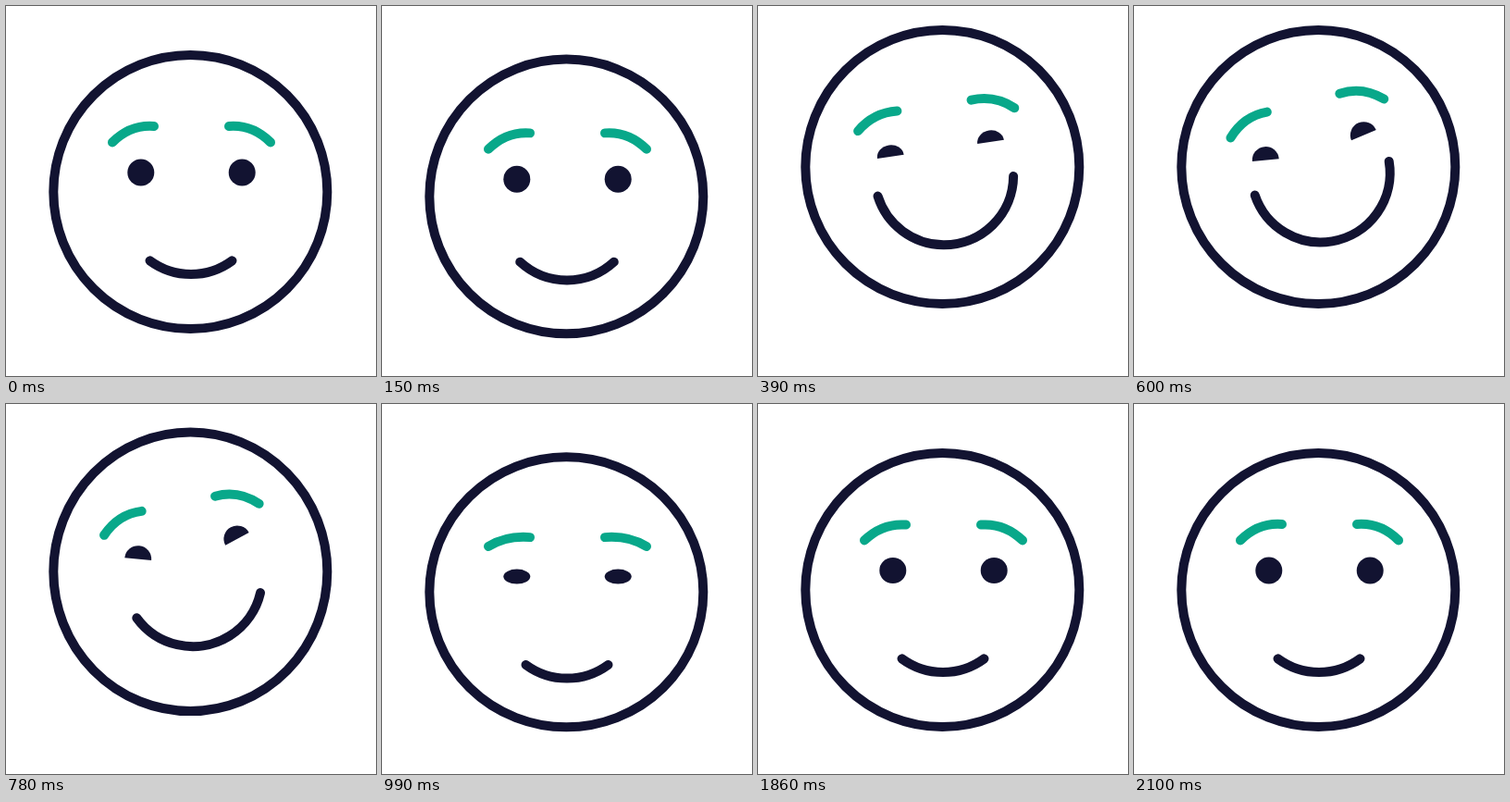
These frames come from a looping animation (400 by 400 pixels, 5.15 s). An HTML page with a canvas:

```html
<!DOCTYPE html>
<html lang="en">
<head>
<meta charset="utf-8">
<title>Happy face</title>
<style>
  html, body { margin: 0; width: 100%; height: 100%; overflow: hidden; background: #fff; }
  canvas { display: block; width: 100%; height: 100%; }
</style>
</head>
<body>
<canvas id="stage"></canvas>
<script>
const LOOP = 5150, STEP = 30, SIZE = 400;
const NAVY = '#121331', GREEN = '#08a88a';
const MID = 200.5, PIVOT = 201;
const canvas = document.getElementById('stage');
const ctx = canvas.getContext('2d');

const rad = deg => deg * Math.PI / 180;

// 0 to 1 between times a and b
function ease(t, a, b) {
  const u = Math.min(1, Math.max(0, (t - a) / (b - a)));
  return u * u * (3 - 2 * u);
}

// Up between a and b, back down between c and d
const hop = (t, a, b, c, d) => ease(t, a, b) - ease(t, c, d);

// A single swell to 1 around a moment
function bump(t, centre, width = 110) {
  const u = (t - centre) / width;
  return Math.abs(u) < 1 ? Math.cos(u * Math.PI / 2) ** 2 : 0;
}

// The head crouches, jumps, lands low and rebounds.
const headY = t => PIVOT - 27 * hop(t, 120, 320, 690, 953)
  + 8 * (bump(t, 120) + bump(t, 920)) - 2 * bump(t, 1110);
const headHeight = t => 306 + 9 * bump(t, 240) + 6 * bump(t, 800) - 4 * bump(t, 990);

// The features follow a little later.
const lift = t => 8 * (bump(t, 130) + bump(t, 960)) - 27.5 * hop(t, 180, 434, 720, 974);
const tilt = t => -14.2 * hop(t, 250, 500, 700, 985);
const laugh = t => hop(t, 60, 464, 640, 960);
const squint = t => Math.max(0, (t - 420) / 21);
const blink = t => bump(t, 300, 120) + bump(t, 930, 120) + bump(t, 1965, 120);

function stroke(color) {
  ctx.strokeStyle = color;
  ctx.stroke();
}

function drawHead(t) {
  ctx.beginPath();
  ctx.ellipse(199.3, headY(t), 148, headHeight(t) / 2 - 5, 0, 0, 2 * Math.PI);
  stroke(NAVY);
}

function drawMouth(t) {
  const open = laugh(t), half = 36.4 + 49 * open;
  ctx.beginPath();
  ctx.arc(-0.5, 215 - PIVOT - 7 * open, 75, rad(90 - half), rad(90 + half));
  stroke(NAVY);
}

// side: -1 left, 1 right
function drawEye(t, side) {
  const happy = t >= 300 && t < 930;
  ctx.save();
  ctx.translate(54.7 * side, 180 - PIVOT);
  if (happy) ctx.rotate(rad(-side * squint(t)));
  ctx.beginPath();
  ctx.ellipse(0, 0, 14.5, 14.5 - 13 * blink(t), 0, happy ? Math.PI : 0, 2 * Math.PI);
  ctx.fillStyle = NAVY;
  ctx.fill();
  ctx.restore();
}

function drawBrow(t, side) {
  const drop = 15 * blink(t);
  ctx.beginPath();
  ctx.moveTo(85.5 * side, 147.4 - PIVOT);
  ctx.quadraticCurveTo(66 * side, 128 + drop - PIVOT, 40.5 * side, 130 + drop - PIVOT);
  stroke(GREEN);
}

function draw(t) {
  const w = canvas.width = Math.round(innerWidth * devicePixelRatio);
  const h = canvas.height = Math.round(innerHeight * devicePixelRatio);
  const k = Math.min(w, h) / SIZE;
  ctx.fillStyle = '#fff';
  ctx.fillRect(0, 0, w, h);
  ctx.setTransform(k, 0, 0, k, (w - SIZE * k) / 2, (h - SIZE * k) / 2);
  ctx.lineWidth = 10;
  ctx.lineCap = 'round';

  drawHead(t);
  ctx.translate(MID, PIVOT + lift(t));
  ctx.rotate(rad(tilt(t)));
  drawMouth(t);
  for (const side of [-1, 1]) {
    drawEye(t, side);
    drawBrow(t, side);
  }
}

const start = performance.now();
function tick() {
  const t = (performance.now() - start) % LOOP;
  draw(Math.floor(t / STEP) * STEP);
  requestAnimationFrame(tick);
}
tick();
</script>
</body>
</html>
```
